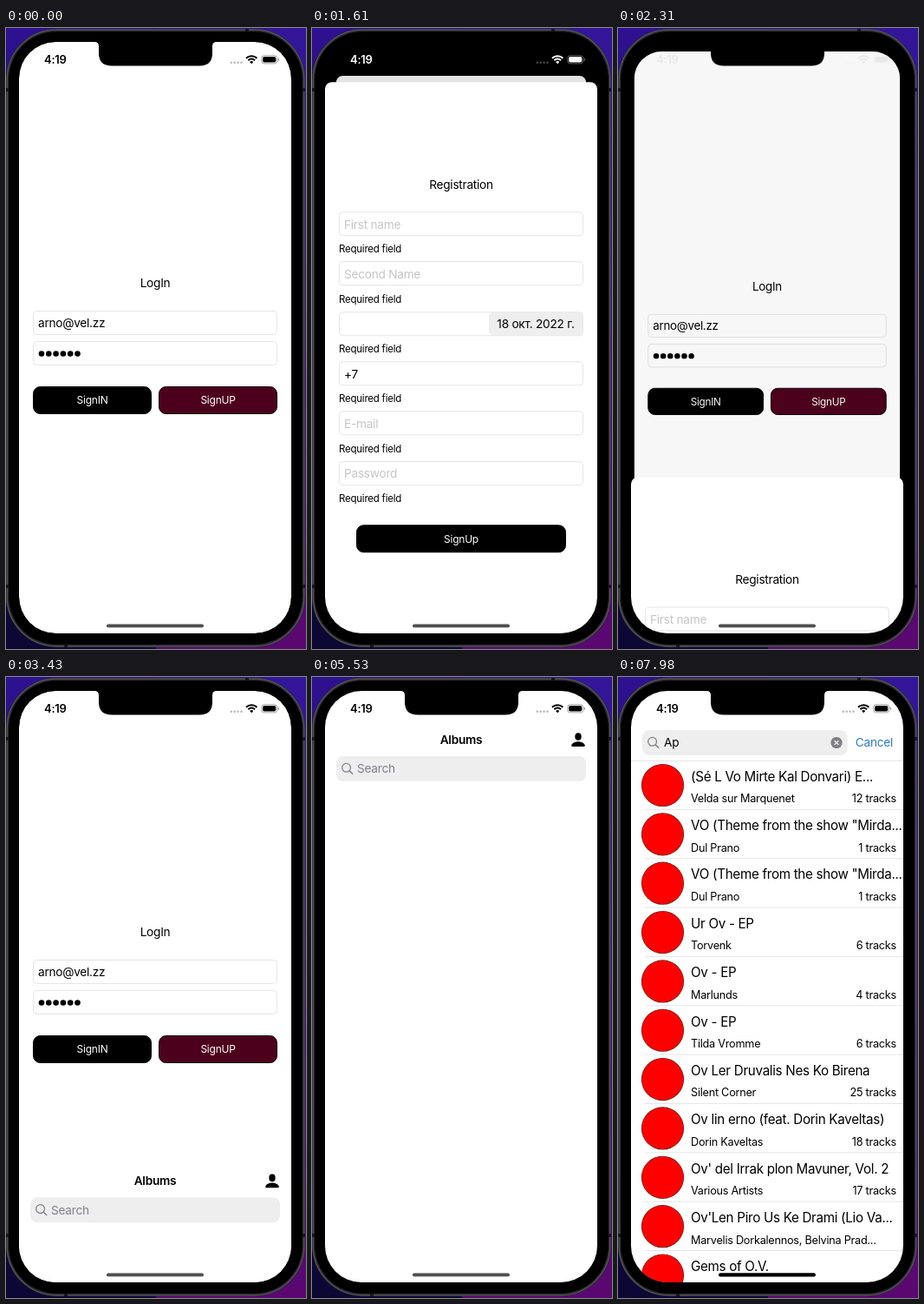
Write an HTML page with a canvas that moves like this. It is 346 px wide and 714 px high and loops after 8000 ms.

```html
<!DOCTYPE html>
<html lang="en">
<head>
<meta charset="utf-8">
<title>Phone app demo</title>
<style>
html, body { margin: 0; width: 100%; height: 100%; overflow: hidden; background: #000; }
canvas { display: block; width: 346px; height: 714px; }
</style>
</head>
<body>
<canvas id="stage"></canvas>
<script>
const W = 346, H = 714, LOOP = 8000, STEP = 70;
const SCREEN = { x: 15, y: 16, w: 314, h: 680, r: 42 };
const SHEET_TOP = 62, SCREEN_BOTTOM = 696;
const FONT = 'Inter, "Open Sans", sans-serif';
const GRAY = '#818186', HINT = '#c5c5c7', BLUE = '#2b7bc3';

const canvas = document.getElementById('stage');
const ratio = window.devicePixelRatio || 1;
canvas.width = W * ratio;
canvas.height = H * ratio;
const c = canvas.getContext('2d');

const clamp = v => Math.min(1, Math.max(0, v));
const ramp = (t, from, to) => clamp((t - from) / (to - from));
const mix = (a, b, p) => a + (b - a) * p;
const smooth = p => p * p * (3 - 2 * p);
const gray = v => { const n = Math.round(v * 255); return `rgb(${n},${n},${n})`; };

// Progress of a critically damped spring.
function spring(t, start, rate) {
  const k = Math.max(0, t - start) / 1000 * rate;
  return 1 - (1 + k) * Math.exp(-k);
}

function box(x, y, w, h, r, fill, stroke, width = 1) {
  c.beginPath();
  c.roundRect(x, y, w, h, r);
  if (fill) { c.fillStyle = fill; c.fill(); }
  if (stroke) { c.strokeStyle = stroke; c.lineWidth = width; c.stroke(); }
}

function disc(x, y, r, fill) {
  c.beginPath();
  c.arc(x, y, r, 0, Math.PI * 2);
  c.fillStyle = fill;
  c.fill();
}

function line(x1, y1, x2, y2, color, width = 1) {
  c.beginPath();
  c.moveTo(x1, y1);
  c.lineTo(x2, y2);
  c.strokeStyle = color;
  c.lineWidth = width;
  c.stroke();
}

function text(str, x, middle, size, { color = '#000', align = 'left', weight = 400 } = {}) {
  c.font = `${weight} ${size}px ${FONT}`;
  c.letterSpacing = `${-0.02 * size}px`;
  c.textAlign = align;
  c.fillStyle = color;
  c.fillText(str, x, middle + size * 0.36);
  return c.measureText(str).width;
}

function faded(alpha, draw) {
  if (alpha <= 0) return;
  c.save();
  c.globalAlpha *= alpha;
  draw();
  c.restore();
}

function shifted(dy, draw) {
  c.save();
  c.translate(0, dy);
  draw();
  c.restore();
}

function field(y, h = 27) {
  box(31.5, y + 0.5, 281, h, 4, '#fff', '#e5e5e7');
}

function button(label, x, y, w, fill) {
  box(x + 0.5, y + 0.5, w - 1, 31, 8, fill, '#0a0508');
  text(label, x + w / 2, y + 16, 12, { color: '#fff', align: 'center' });
}

function drawBackdrop() {
  const sides = [[0, '#2e1190', '#0c0733'], [W / 2, '#32169a', '#5a0870']];
  for (const [x, top, bottom] of sides) {
    const g = c.createLinearGradient(0, 0, 0, H);
    g.addColorStop(0, top);
    g.addColorStop(1, bottom);
    c.fillStyle = g;
    c.fillRect(x, 0, W / 2, H);
  }
  box(0, 1, 345, 711, 58, '#29292c');
  box(1.2, 2.2, 342.6, 708.6, 57, null, '#57575b', 1.2);
  c.fillStyle = '#171719';
  for (const y of [69, 640]) {
    c.fillRect(0, y, 3, 4);
    c.fillRect(342, y, 3, 4);
  }
  c.fillRect(276, 1, 4, 3);
  c.fillRect(67, 709, 4, 3);
  box(3.2, 4.2, 338.6, 704.6, 55, '#000');
}

function drawLogin() {
  box(SCREEN.x, SCREEN.y, SCREEN.w, SCREEN.h, 0, '#fff');
  text('LogIn', 172, 293, 13.7, { align: 'center' });
  field(325);
  text('arno@vel.zz', 37, 339, 13.7);
  field(360);
  for (let i = 0; i < 6; i++) disc(41 + i * 8.3, 374.5, 3.3, '#000');
  button('SignIN', 31, 412, 137, '#000');
  button('SignUP', 176, 412, 137, '#4d001c');
}

// The login view shrinks and dims behind the sheet as p goes to 1.
function drawPresenter(p) {
  const scale = mix(1, 288 / 314, p);
  c.save();
  c.translate(172, mix(16, 55, p));
  c.scale(scale, scale);
  c.translate(-172, -16);
  c.beginPath();
  c.roundRect(SCREEN.x, SCREEN.y, SCREEN.w, SCREEN.h, mix(SCREEN.r, 8, p));
  c.clip();
  drawLogin();
  c.fillStyle = `rgba(0,0,0,${0.11 * p})`;
  c.fillRect(SCREEN.x, SCREEN.y, SCREEN.w, SCREEN.h);
  c.restore();
}

function drawRegistration() {
  box(15, SHEET_TOP, 314, 700, 8, '#fff');
  text('Registration', 172, 180, 13.7, { align: 'center' });
  const hints = ['First name', 'Second Name', '', '+7', 'E-mail', 'Password'];
  hints.forEach((hint, i) => {
    const y = 211 + i * 57.3;
    field(Math.round(y));
    text(hint, 37, y + 14.5, 13.7, { color: hint === '+7' ? '#000' : HINT });
    text('Required field', 31, y + 43, 11.5);
  });
  box(204, 326.5, 108.5, 26.5, 5, '#eeeeef');
  text('18 окт. 2022 г.', 258, 340, 13.7, { align: 'center' });
  button('SignUp', 51, 571, 242, '#000');
}

function drawPerson() {
  c.beginPath();
  c.ellipse(307, 68.6, 3.7, 4.3, 0, 0, Math.PI * 2);
  c.fillStyle = '#000';
  c.fill();
  c.beginPath();
  c.moveTo(300.8, 80);
  c.bezierCurveTo(297, 80, 300, 74.2, 307, 74.2);
  c.bezierCurveTo(314, 74.2, 317, 80, 313.2, 80);
  c.fill();
}

function caretAlpha(t) {
  if (t < 6300) return ramp(t, 5670, 5880);
  if (t < 6650) return 1 - ramp(t, 6230, 6440);
  if (t < 7070) return ramp(t, 6580, 6790);
  return 1 - ramp(t, 7770, 7980);
}

function drawSearch(t, p) {
  const y = mix(91, 61, p), right = mix(316, 264.5, p), middle = y + 14.5;
  const query = t >= 7280 ? 'Ap' : t >= 7070 ? 'A' : '';
  box(28, y, right - 28, 29, 8, '#eeeeef');
  c.beginPath();
  c.arc(39.6, middle - 1.2, 4.9, 0, Math.PI * 2);
  c.strokeStyle = GRAY;
  c.lineWidth = 1.3;
  c.stroke();
  line(43.2, middle + 2.4, 47.2, middle + 6.2, GRAY, 1.5);

  let caretX = 53;
  if (query) {
    caretX += text(query, 53, middle, 13.7);
    disc(252, middle, 6.6, '#7f7f84');
    line(249.6, middle - 2.4, 254.4, middle + 2.4, '#fff', 1.2);
    line(254.4, middle - 2.4, 249.6, middle + 2.4, '#fff', 1.2);
  } else {
    text('Search', 52, middle, 13.7, { color: GRAY });
  }
  faded(caretAlpha(t), () => box(caretX - 0.2, middle - 9, 1.8, 18.5, 0.9, '#2f6fdd'));
  faded(p, () => text('Cancel', right + 9.3, middle - 0.5, 13.7, { color: BLUE }));
}

const ALBUMS = [
  ['(Sé L Vo Mirte Kal Donvari) E...', 'Velda sur Marquenet', 12],
  ['VO (Theme from the show "Mirda...', 'Dul Prano', 1],
  ['VO (Theme from the show "Mirda...', 'Dul Prano', 1],
  ['Ur Ov - EP', 'Torvenk', 6],
  ['Ov - EP', 'Marlunds', 4],
  ['Ov - EP', 'Tilda Vromme', 6],
  ['Ov Ler Druvalis Nes Ko Birena', 'Silent Corner', 25],
  ['Ov lin erno (feat. Dorin Kaveltas)', 'Dorin Kaveltas', 18],
  ["Ov' del Irrak plon Mavuner, Vol. 2", 'Various Artists', 17],
  ["Ov'Len Piro Us Ke Drami (Lio Va...", 'Marvelis Dorkalennos, Belvina Prad...', 0],
  ['Gems of O.V.', '', 0]
];

function drawAlbumRows() {
  line(15, 96.5, 329, 96.5, '#d9d9db', 0.7);
  ALBUMS.forEach(([title, artist, tracks], i) => {
    const y = 96 + i * 56.35;
    disc(51.5, y + 28.5, 24.6, '#4a2a1c');
    disc(51.5, y + 28.5, 24, '#ff0000');
    text(title, 84, y + 18.3, 15.2);
    text(artist, 84, y + 43.8, 12.7);
    if (tracks) text(`${tracks} tracks`, 321, y + 43.8, 12.7, { align: 'right' });
    line(31, y + 56.4, 329, y + 56.4, '#dcdcde', 0.7);
  });
}

function drawAlbums(t) {
  const p = smooth(ramp(t, 5620, 6020));
  box(SCREEN.x, SCREEN.y, SCREEN.w, SCREEN.h, 0, '#fff');
  faded(1 - p * 2, () => {
    text('Albums', 172, 72, 13.7, { align: 'center', weight: 600 });
    drawPerson();
  });
  if (t >= 7980) drawAlbumRows();
  drawSearch(t, p);
}

function drawStatus(level) {
  const color = gray(level);
  text('4:19', 44, 36.5, 13, { color, weight: 600 });
  for (let i = 0; i < 4; i++) {
    faded(0.28, () => disc(259.8 + i * 3.9, 39.8, 1.3, color));
  }
  c.strokeStyle = color;
  c.lineWidth = 2;
  for (const r of [8.8, 5.4]) {
    c.beginPath();
    c.arc(283.2, 41, r, -Math.PI * 0.75, -Math.PI * 0.25);
    c.stroke();
  }
  c.beginPath();
  c.moveTo(283.2, 41.2);
  c.arc(283.2, 41.2, 3, -Math.PI * 0.75, -Math.PI * 0.25);
  c.fillStyle = color;
  c.fill();
  faded(0.4, () => {
    box(294.7, 31.7, 18, 9.2, 3, null, color, 0.9);
    box(313.8, 34.8, 1.2, 3, 0.6, color);
  });
  box(296.1, 33.1, 15.2, 6.4, 1.8, color);
}

function drawNotch() {
  c.fillStyle = '#000';
  c.fill(new Path2D('M102 15.5 V16 Q107 16 107 21 V29 Q107 43.5 122 43.5 H223 Q238 43.5 238 29 V21 Q238 16 243 16 V15.5 Z'));
}

function drawHomeBar(solid) {
  const g = c.createLinearGradient(0, 685, 0, 690);
  g.addColorStop(0, gray(mix(0.5, 0, solid)));
  g.addColorStop(0.5, gray(mix(0.25, 0, solid)));
  g.addColorStop(1, gray(mix(0.55, 0, solid)));
  box(116, 685.3, 112, 4.2, 2.1, g);
}

function draw(time) {
  const t = Math.floor((time % LOOP) / STEP) * STEP;
  const sheet = t < 2170 ? spring(t, 1050, 18.4) : 1 - spring(t, 2100, 12);
  const cover = spring(t, 3376, 18);
  const light = t < 2170 ? ramp(t, 1050, 1450) : 1 - ramp(t, 2275, 2660);

  c.setTransform(ratio, 0, 0, ratio, 0, 0);
  drawBackdrop();

  c.save();
  c.beginPath();
  c.roundRect(SCREEN.x, SCREEN.y, SCREEN.w, SCREEN.h, SCREEN.r);
  c.clip();
  if (t < 3920) {
    const p = sheet < 0.003 ? 0 : sheet;
    drawPresenter(p);
    if (p) shifted((1 - p) * (SCREEN_BOTTOM - SHEET_TOP), drawRegistration);
  }
  if (cover > 0) {
    const offset = t >= 3920 ? 0 : (1 - cover) * SCREEN.h;
    shifted(offset, () => drawAlbums(t));
  }
  drawNotch();
  drawStatus(light);
  drawHomeBar(ramp(t, 5620, 6020));
  c.restore();
}

function tick() {
  draw(performance.now());
  requestAnimationFrame(tick);
}
tick();
</script>
</body>
</html>
```
